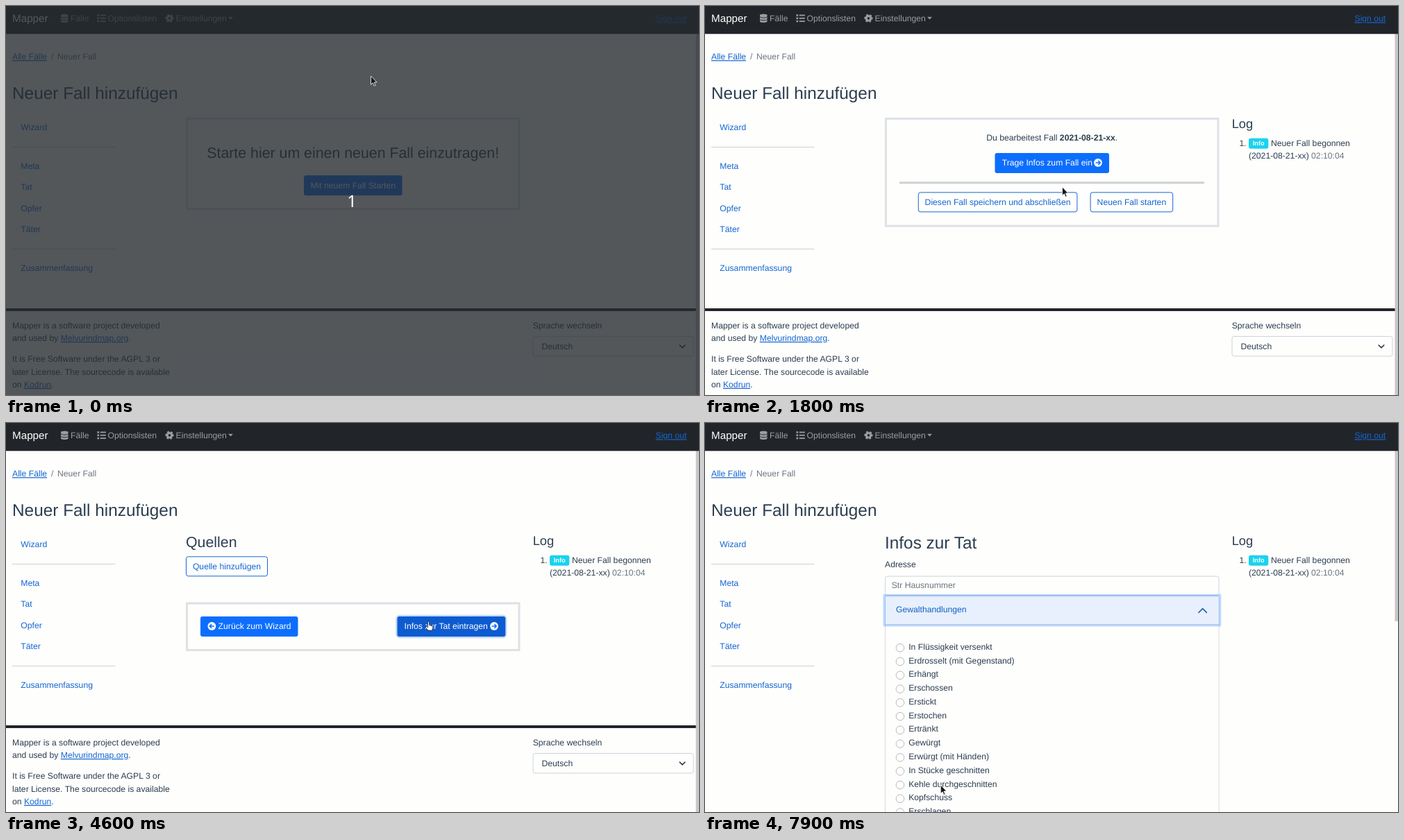
Write an HTML page that moves like this. It is 998 px wide and 561 px high and loops after 8000 ms.

```html
<!DOCTYPE html>
<html lang="de">
<head>
<meta charset="utf-8">
<title>Neuer Fall</title>
<style>
  html, body { margin: 0; width: 100%; height: 100%; overflow: hidden; background: #fefefd; }
  svg { display: block; width: 998px; height: 561px; }
  text { font: 12.19px "Liberation Sans", Arial, sans-serif; fill: #2c3e50; text-rendering: geometricPrecision; white-space: pre; }
  text.h2 { font-size: 24.38px; }
  text.h3 { font-size: 21.33px; }
  text.h4 { font-size: 18.28px; }
  text.brand { font-size: 15.23px; fill: #fff; }
  text.nav { fill: #9b9d9f; }
  text.link, .link { fill: #1466d2; }
  .u { text-decoration: underline; }
  text.muted, .muted { fill: #6c757d; }
  text.white { fill: #fff; }
  text.mid { text-anchor: middle; }
  text.badge { font-size: 9.14px; font-weight: bold; fill: #fff; }
  text.count { font: 24px "Noto Sans", "Open Sans", sans-serif; fill: #fff; text-anchor: middle; }
  .b { font-weight: bold; }
  .btn { fill: #0d6efd; }
  .btn.hover { fill: #0d5bd0; }
  .outline { fill: none; stroke: #1466d2; }
  .card { fill: none; stroke: #dee2e6; stroke-width: 3; }
  .field { fill: #fefefd; stroke: #ced4da; }
  .ring { fill: none; stroke: #0d6efd; stroke-opacity: .27; stroke-width: 3; }
  .rule { fill: #cfd0d2; }
</style>
</head>
<body>
<svg id="stage" viewBox="0 0 998 561" xmlns="http://www.w3.org/2000/svg"></svg>
<script>
const text = (x, y, str, cls = '') => `<text x="${x}" y="${y}" class="${cls}">${str}</text>`;
const rect = (x, y, w, h, cls = '', more = '') =>
  `<rect x="${x}" y="${y}" width="${w}" height="${h}" class="${cls}" ${more}/>`;
const path = (d, more) => `<path d="${d}" ${more}/>`;
const group = (id, ...parts) => `<g id="${id}">${parts.join('')}</g>`;
const button = (x, y, w, label, lx, id = '') =>
  rect(x, y, w, 29, 'btn', `rx="3" id="${id}"`) + text(lx, y + 18.2, label, 'white');
const outlineButton = (x, y, w, label) =>
  rect(x + .5, y + .5, w - 1, 28, 'outline', 'rx="3"') + text(x + w / 2, y + 18.2, label, 'link mid');
const arrowIcon = (x, y, dir) => `<g transform="translate(${x} ${y}) scale(${dir} 1)">
  <circle r="5.9" fill="#fff"/>${path('M-3.4 0H3M.2-3L3.2 0L.2 3', 'fill="none" stroke="#0d6efd" stroke-width="1.6"')}</g>`;
const chevron = (w, h, color) =>
  path(`M${-w} ${-h}L0 ${h}L${w} ${-h}`, `fill="none" stroke="${color}" stroke-width="1.5" stroke-linecap="round" stroke-linejoin="round"`);

const grey = 'fill="#9b9d9f"';
const navbar = group('navbar',
  rect(0, 0, 998, 40.3, '', 'fill="#212529"'),
  text(9, 23, 'Mapper', 'brand'),
  path('M79 13.6a5.3 2 0 0 1 10.6 0v1a5.3 2 0 0 1-10.6 0zM79 16.3q5.3 2.6 10.6 0v2a5.3 2 0 0 1-10.6 0zM79 20q5.3 2.6 10.6 0v2a5.3 2 0 0 1-10.6 0z', grey),
  text(93, 22.3, 'Fälle', 'nav'),
  [13.4, 17.7, 22].map(y => rect(131.5, y - 1.3, 2.6, 2.6, '', grey) + rect(135.7, y - .9, 8.2, 1.8, '', grey)).join(''),
  text(146.6, 22.3, 'Optionslisten', 'nav'),
  '<g fill="none" stroke="#9b9d9f"><circle cx="235.5" cy="17.7" r="3.3" stroke-width="3"/><circle cx="235.5" cy="17.7" r="5" stroke-width="2.2" stroke-dasharray="2.9 2.336" transform="rotate(-16 235.5 17.7)"/></g>',
  text(244.6, 22.3, 'Einstellungen', 'nav'),
  path('M320 15.8h7l-3.5 3.5z', grey),
  text(935.5, 22.3, 'Sign out', 'link u'));

const sidebar = group('sidebar',
  text(9, 77.2, 'Alle Fälle', 'link u'), text(65, 77.2, '/', 'muted'), text(74, 77.2, 'Neuer Fall', 'muted'),
  text(9, 134.3, 'Neuer Fall hinzufügen', 'h2'),
  [['Wizard', 179], ['Meta', 234.6], ['Tat', 265], ['Opfer', 295.5], ['Täter', 326], ['Zusammenfassung', 381.6]]
    .map(([s, y]) => text(21.3, y, s, 'link')).join(''),
  rect(9, 203, 148.5, 1, 'rule'), rect(9, 350, 148.5, 1, 'rule'));

const footer = group('footer',
  rect(0, 436, 998, 4, '', 'fill="#212529"'),
  text(9, 464.7, 'Mapper is a software project developed'),
  text(9, 483, 'and used by <tspan class="link u">Melvurindmap.org</tspan>.'),
  text(9, 513.4, 'It is Free Software under the AGPL 3 or'),
  text(9, 531.6, 'later License. The sourcecode is available'),
  text(9, 549.9, 'on <tspan class="link u">Kodrun</tspan>.'),
  text(758.7, 464.7, 'Sprache wechseln'),
  rect(759, 476.5, 231, 28.5, 'field', 'rx="3"'),
  text(771.5, 494.6, 'Deutsch'),
  `<g transform="translate(974 491)">${chevron(3.8, 1.9, '#343a40')}</g>`);

const log = group('log',
  text(758.7, 176.2, 'Log', 'h4'),
  text(769.5, 201.5, '1.'),
  rect(783, 190.7, 28.3, 15, '', 'rx="3" fill="#1ad3ef"'), text(797.2, 201.3, 'Info', 'badge mid'),
  text(815, 201.5, 'Neuer Fall begonnen'),
  text(783, 219.7, '(2021-08-21-xx) <tspan class="muted">02:10:04</tspan>'));

const start = group('start',
  rect(260.5, 162.5, 478.5, 130, 'card'),
  text(499.7, 218.5, 'Starte hier um einen neuen Fall einzutragen!', 'h3 mid'),
  rect(427.5, 242.8, 144.5, 32, 'ring', 'rx="4" id="startRing"'),
  button(429, 244.3, 141.5, 'Mit neuem Fall Starten', 438.4, 'startBtn'));

const wizard = group('wizard',
  rect(260.5, 162.5, 478.5, 154.7, 'card'),
  text(499.7, 194.3, 'Du bearbeitest Fall <tspan class="b">2021-08-21-xx</tspan>.', 'mid'),
  button(417.5, 212, 164.5, 'Trage Infos zum Fall ein', 427.7, 'infoBtn'), arrowIcon(566, 226, 1),
  rect(280, 253.4, 439, 3, 'rule'),
  outlineButton(306.8, 268.4, 229.6, 'Diesen Fall speichern und abschließen'),
  outlineButton(554.6, 268.4, 119.6, 'Neuen Fall starten'));

const sources = group('sources',
  text(259, 179.2, 'Quellen', 'h3'),
  outlineButton(259, 192.3, 118, 'Quelle hinzufügen'),
  rect(260.5, 260, 478.5, 67.5, 'card'),
  button(280, 279, 140.5, 'Zurück zum Wizard', 305.6), arrowIcon(296.4, 293, -1),
  rect(562.8, 278.3, 157, 30.4, 'ring', 'rx="4" id="crimeRing"'),
  button(563.5, 279, 155.7, 'Infos zur Tat eintragen', 573.5, 'crimeBtn'), arrowIcon(703, 293, 1));

const items = ['In Flüssigkeit versenkt', 'Erdrosselt (mit Gegenstand)', 'Erhängt', 'Erschossen', 'Erstickt', 'Erstochen',
  'Ertränkt', 'Gewürgt', 'Erwürgt (mit Händen)', 'In Stücke geschnitten', 'Kehle durchgeschnitten', 'Kopfschuss', 'Erschlagen'];
const crime = group('crime',
  text(259, 181.4, 'Infos zur Tat', 'h2'),
  text(259, 208, 'Adresse'),
  rect(259.5, 221, 480.6, 27.5, 'field', 'rx="3"'), text(268.7, 237.8, 'Str Hausnummer', 'muted'),
  '<clipPath id="clip"><rect id="clipRect" x="255" y="291" width="490" height="0"/></clipPath>',
  '<g clip-path="url(#clip)">',
  rect(259.5, 285, 480.6, 546, '', 'fill="none" stroke="#d9dadb"'),
  items.map((s, i) => `<circle cx="281" cy="${324.2 + 19.78 * i}" r="5.8" fill="#fefefd" stroke="#b9babb"/>` +
    text(293.2, 326.8 + 19.78 * i, s)).join(''),
  '</g>',
  rect(258, 248.3, 483.8, 43.6, 'ring', 'id="headRing"'),
  rect(259.5, 249.7, 480.8, 41, '', 'id="head"'),
  text(275, 272.8, 'Gewalthandlungen', '').replace('<text', '<text id="headText"'),
  `<g id="headArrow">${chevron(5.7, 2.9, '#1f5fae')}</g>`,
  '<g id="crimeNav">',
  rect(260.5, 330.5, 478.5, 67.5, 'card'),
  button(280, 349.5, 120, 'Zurück zu Meta', 305.6), arrowIcon(296.4, 363.5, -1),
  button(546, 349.5, 173, 'Infos zum Opfer eintragen', 556), arrowIcon(703, 363.5, 1),
  '</g>');

const overlay = group('overlay',
  rect(0, 0, 998, 561, '', 'fill="#252a30" fill-opacity=".79"'), text(498, 289.5, '1', 'count'));

const cursor = group('cursor',
  path('M0 0V12.4L2.8 9.8L4.7 14.3L6.7 13.4L4.8 9H8.6Z', 'id="arrow" fill="#15171a" stroke="#fff" stroke-width=".8"'),
  path('M-1.2 1a1.2 1.2 0 0 1 2.4 0V5l3.4.8q1.9.5 1.7 2.2l-.6 3.2q-.3 1.5-1.7 1.5H.4q-1.2 0-1.9-1L-4.2 8.3q-.6-1 .3-1.6q.9-.3 1.7.6l1 1z',
    'id="hand" fill="#fff" stroke="#15171a" stroke-width=".9"'));

document.getElementById('stage').innerHTML = rect(0, 0, 998, 561, '', 'fill="#fefefd"') +
  sidebar + start + wizard + sources + crime + log + footer +
  rect(993.5, 40, 4.5, 521, '', 'fill="#c6c7c9" id="thumb"') + navbar + overlay + cursor;

const el = id => document.getElementById(id);
const show = (id, on) => el(id).setAttribute('display', on ? 'inline' : 'none');
const set = (id, name, value) => el(id).setAttribute(name, value);
const hover = (id, on) => el(id).classList.toggle('hover', on);

// Pointer path: time, x, y
const track = [
  [200, 525.5, 101], [300, 525.3, 101.5], [500, 525.3, 101.5], [900, 519, 200], [1200, 515, 273], [1400, 514.5, 261],
  [1900, 514.5, 261], [2000, 522, 264], [2300, 690, 236], [2600, 810, 188], [2700, 810, 188], [3000, 862, 164],
  [3200, 800, 215], [3400, 660, 250], [3600, 563, 210], [3800, 556.5, 218.5], [4100, 556.5, 218.5],
  [4500, 608.5, 286.5], [4700, 608.5, 286.5], [5000, 544, 269], [5100, 470, 254.5], [5200, 470, 254.5],
  [5300, 450.5, 254.5], [5500, 450.5, 254.5], [6000, 372, 373], [6100, 372, 373], [6600, 335, 481],
  [7000, 335, 481], [7200, 334.5, 494], [7300, 334.5, 494], [7500, 339, 503], [7700, 339, 503], [7900, 339.3, 522]
];
const hands = [[1100, 1600], [3700, 4000], [4400, 5700]];
const OPEN = 5550;

function pointer(t) {
  const i = track.findIndex(k => k[0] >= t);
  if (i <= 0) return track[0].slice(1);
  const [t0, x0, y0] = track[i - 1], [t1, x1, y1] = track[i], p = (t - t0) / (t1 - t0);
  return [x0 + (x1 - x0) * p, y0 + (y1 - y0) * p];
}

function draw(t) {
  const within = (a, b) => t >= a && t < b;
  show('overlay', t < 100);
  show('start', t < 1600);
  show('wizard', within(1600, 4000));
  show('sources', within(4000, 4700));
  show('crime', t >= 4700);
  show('log', t >= 1600);

  hover('startBtn', within(1100, 1600));
  show('startRing', within(1500, 1600));
  hover('infoBtn', t >= 3700);
  hover('crimeBtn', t >= 4400);
  show('crimeRing', t >= 4600);

  const p = Math.min(1, Math.max(0, (t - OPEN) / 350));
  const grow = 540 * p * p * (3 - 2 * p);
  const open = t >= OPEN;
  set('clipRect', 'height', grow);
  set('crimeNav', 'transform', `translate(0 ${grow})`);
  set('footer', 'transform', `translate(0 ${t >= 4700 ? 8 + grow : 0})`);
  set('thumb', 'height', Math.max(0, 561 * 561 / (561 + grow) - 40));
  show('headRing', open);
  set('head', 'fill', open ? '#e7f0fc' : '#fefefd');
  set('head', 'stroke', open ? '#9fc0ee' : '#d9dadb');
  el('headText').style.fill = open ? '#1460c4' : '#2c3e50';
  const turn = 180 * Math.min(1, Math.max(0, (t - OPEN) / 200));
  set('headArrow', 'transform', `translate(716.7 270.5) rotate(${-turn})`);

  const hand = hands.some(([a, b]) => within(a, b));
  show('hand', hand);
  show('arrow', !hand);
  set('cursor', 'transform', `translate(${pointer(t)})`);
}

const begin = performance.now();
function tick() {
  const t = (performance.now() - begin) % 8000;
  draw(Math.floor(t / 100) * 100);
  requestAnimationFrame(tick);
}
tick();
</script>
</body>
</html>
```
